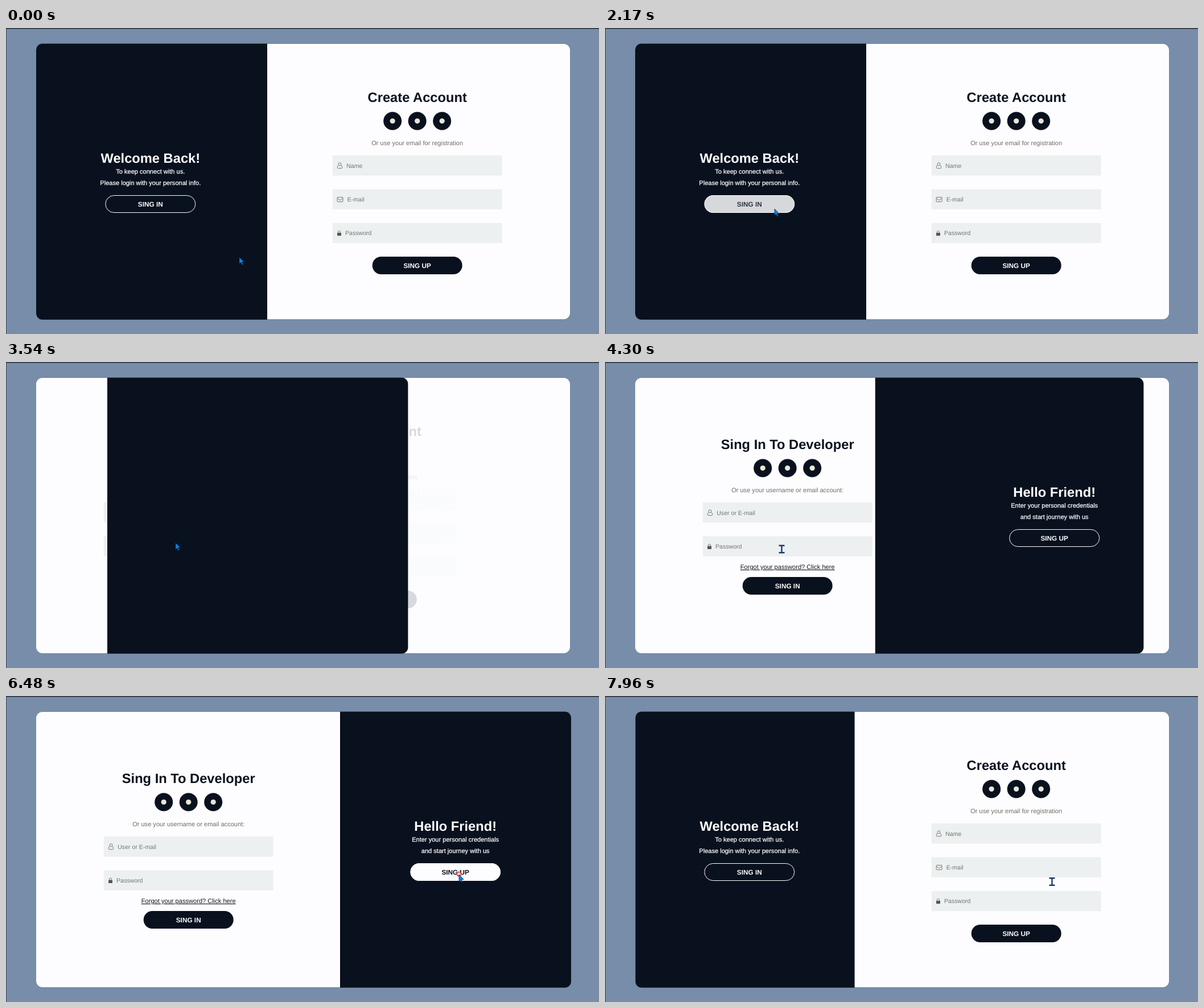
Recreate the animation shown at these times as an HTML page. Size 1042 by 538 pixels, loop 8 s.

```html
<!DOCTYPE html>
<html lang="en">
<head>
<meta charset="utf-8">
<title>Sliding login</title>
<style>
  html, body { margin: 0; width: 100%; height: 100%; overflow: hidden; background: #778da9; }
  svg { display: block; width: 1042px; height: 538px; }
  text {
    font-family: "Liberation Sans", Arial, sans-serif;
    font-size: 11.05px;
    text-anchor: middle;
    text-rendering: geometricPrecision;
  }
  .title { font-size: 23.7px; font-weight: bold; }
  .label { font-size: 11.8px; font-weight: bold; }
  .hint { font-size: 10.6px; text-anchor: start; fill: #74766f; }
  .note { fill: #6c6d66; }
  .link { font-size: 11.1px; fill: #16181c; text-decoration: underline; }
  .dark { fill: #09111e; }
  .light { fill: #fdfdff; }
  .line { fill: none; stroke: #fdfdff; }
  .soft { stroke: #fdfdff; stroke-width: .25; }
  .icon { fill: none; stroke: #74766f; }
</style>
</head>
<body>
<svg viewBox="0 0 1042 538">
  <defs>
    <radialGradient id="glow">
      <stop offset="0" stop-color="#fff"/>
      <stop offset=".3" stop-color="#ffdcdc"/>
      <stop offset=".85" stop-color="#f23c3c"/>
      <stop offset="1" stop-color="#d83030"/>
    </radialGradient>
  </defs>
  <rect width="1042" height="538" fill="#778da9"/>
  <rect width="1042" height="1.5" fill="#272b35"/>
  <rect width="1" height="538" fill="#3c4654"/>
  <rect x="53" y="28" width="938" height="484" rx="11" class="light"/>
  <g id="signIn"></g>
  <g id="signUp"></g>
  <path id="panel" class="dark"/>
  <g id="welcome"></g>
  <g id="hello"></g>
  <g id="pointer">
    <circle id="ripple" cy="-1" fill="url(#glow)"/>
    <path id="arrow" d="M0 0V11.5L2.7 9.2L4.6 13.4L6.5 12.5L4.6 8.5H8.2Z"
      fill="#0a84ea" stroke="#06203f" stroke-width=".7"/>
    <path id="beam" d="M-4.5 -6.3H5.5M-4.5 6.3H5.5M.5 -6V6" fill="none" stroke="#1b3a70" stroke-width="2.4"/>
  </g>
</svg>
<script>
const LOOP = 8000;
const OPEN = 2815;   // forms swap, panel goes right
const CLOSE = 6580;  // forms swap back
const FADE = 1000, SHIFT = 94;
const LEFT = 53, TRAVEL = 534;
const REST = 406, NARROW = 376, SWELL = 190;
const $ = id => document.getElementById(id);

// ---- page parts
const text = (x, y, cls, s) => `<text x="${x}" y="${y}" class="${cls}">${s}</text>`;

const icons = {
  user: `<circle cx="4.8" cy="-2.6" r="2.5"/>
    <path d="M2.9 -.6C1.1 -.2 .6 1.6 .6 3.4Q.6 4.7 2 4.7H7.6Q9 4.7 9 3.4C9 1.6 8.5 -.2 6.7 -.6"/>`,
  mail: `<rect x=".5" y="-3.9" width="9.8" height="8" rx="1"/><path d="M.7 -2.2L5.4 1.5L10.1 -2.2"/>`,
  lock: `<rect x=".3" y="-.8" width="7" height="5.3" rx=".7" fill="#55574f" stroke="none"/>
    <path d="M1.8 -.6V-2.2A2 2 0 0 1 5.8 -2.2V-.6"/>`
};
const indent = { user: 24.5, mail: 26, lock: 22.3 };

const fields = (cx, top, list) => list.map(([icon, label], i) => {
  const x = cx - 149, y = top + i * 59.4;
  return `<rect x="${x}" y="${y}" width="298" height="35.5" fill="#ecf0f0"/>
    <g class="icon" transform="translate(${x + 8} ${y + 18})">${icons[icon]}</g>` +
    text(x + indent[icon], y + 21.5, 'hint', label);
}).join('');

const heading = (cx, y, title, note) =>
  text(cx, y, 'title dark', title) +
  [-43.5, 0, 43.5].map(d =>
    `<circle cx="${cx + d}" cy="${y + 33.5}" r="16" class="dark"/>
     <circle cx="${cx + d}" cy="${y + 33.5}" r="4.6" fill="#e9e6d8"/>`).join('') +
  text(cx, y + 76, 'note', note);

const pill = (cx, y, cls, h = 31) =>
  `<rect x="${cx - 79}" y="${y}" width="158" height="${h}" rx="${h / 2}" class="${cls}"/>`;

const button = (cx, y, label) => pill(cx, y, 'dark') + text(cx, y + 19.8, 'label light', label);

const greeting = (cx, title, first, second, label) =>
  text(cx, 237.3, 'title light', title) + text(cx, 256.2, 'light soft', first) +
  text(cx, 276, 'light soft', second) + text(cx, 314, 'label light', label) +
  pill(cx, 294.5, 'line', 30) +
  `<g class="hot">${pill(cx, 294, 'light')}${text(cx, 314, 'label dark', label)}</g>`;

const UP = 722.7, IN = 320.7;
$('signUp').innerHTML =
  heading(UP, 130, 'Create Account', 'Or use your email for registration') +
  fields(UP, 224, [['user', 'Name'], ['mail', 'E-mail'], ['lock', 'Password']]) +
  button(UP, 402, 'SING UP');
$('signIn').innerHTML =
  heading(IN, 153, 'Sing In To Developer', 'Or use your username or email account:') +
  fields(IN, 247, [['user', 'User or E-mail'], ['lock', 'Password']]) +
  text(IN, 364, 'link', 'Forgot your password? Click here') +
  button(IN, 378, 'SING IN');
$('welcome').innerHTML = greeting(253.8, 'Welcome Back!', 'To keep connect with us.',
  'Please login with your personal info.', 'SING IN');
$('hello').innerHTML = greeting(789.7, 'Hello Friend!', 'Enter your personal credentials',
  'and start journey with us', 'SING UP');
const hotIn = $('welcome').querySelector('.hot');
const hotUp = $('hello').querySelector('.hot');

// ---- motion rules
const part = (t, start, length) => Math.min(1, Math.max(0, (t - start) / length));
const ease = p => p < .5 ? 2 * p * p : 1 - 2 * (1 - p) * (1 - p);

// narrow, wide in the middle, narrow again; at rest outside the span
function panelWidth(p) {
  if (p <= 0 || p >= 1) return REST;
  return NARROW + SWELL * ease(1 - Math.abs(2 * p - 1));
}

function panelBox(t) {
  const go = ease(part(t, 2762, 2277)), back = ease(part(t, 6642, 1340));
  const p = t < CLOSE ? part(t, 2900, 1870) : part(t, 6680, 1390);
  return [LEFT + TRAVEL * (go - back), panelWidth(p)];
}

const pulse = (t, start) => 10.4 * Math.sin(Math.PI * part(t, start, 600));

// each move: start, length, new place
const moves = [
  { at: 80, ms: 70, x: 407, y: 403 },
  { at: 1140, ms: 800, x: 298, y: 318 },
  { at: 3700, ms: 200, x: 310, y: 329 },
  { at: 5000, ms: 900, x: 796, y: 314 },
  { at: 7520, ms: 200, x: 785, y: 326.5 }
];
function pointerAt(t) {
  let x = 410, y = 403;
  for (const m of moves) {
    const p = ease(part(t, m.at, m.ms));
    x += (m.x - x) * p;
    y += (m.y - y) * p;
  }
  return [x, y];
}

// ---- drawing
function panelPath(l, w, roundLeft) {
  const r = l + w, a = roundLeft ? 11 : 0, b = 11 - a;
  const arc = (n, x, y) => `a${n} ${n} 0 0 1 ${x} ${y}`;
  return `M${l + a} 27.5H${r - b}${arc(b, b, b)}V${512.8 - b}${arc(b, -b, b)}` +
    `H${l + a}${arc(a, -a, -a)}V${27.5 + a}${arc(a, a, -a)}Z`;
}

function show(el, opacity, x = 0, y = 0) {
  el.setAttribute('opacity', opacity);
  el.setAttribute('transform', `translate(${x} ${y})`);
}

function draw(t) {
  const opened = t >= OPEN && t < CLOSE;
  $('panel').setAttribute('d', panelPath(...panelBox(t), !opened));

  const upGone = opened ? ease(part(t, OPEN, FADE)) : 0;
  const inGone = opened ? 0 : t < OPEN ? 1 : ease(part(t, CLOSE, FADE));
  show($('signUp'), 1 - upGone, -SHIFT * upGone);
  show($('signIn'), 1 - inGone, SHIFT * inGone);

  show($('welcome'), opened ? 0 : 1);
  show($('hello'), opened ? 1 : 0);
  show(hotIn, t < OPEN ? part(t, 1960, 250) : 0);
  show(hotUp, part(t, 5840, 250));

  const [x, y] = pointerAt(t);
  const typing = (t > 3800 && t < 5900 && x < 470) || t > 7560;
  show($('pointer'), 1, x, y);
  show($('arrow'), typing ? 0 : 1);
  show($('beam'), typing ? 1 : 0);
  $('ripple').setAttribute('r', pulse(t, 2670) + pulse(t, 6394));
}

function tick() {
  draw(performance.now() % LOOP);
  requestAnimationFrame(tick);
}
tick();
</script>
</body>
</html>
```
